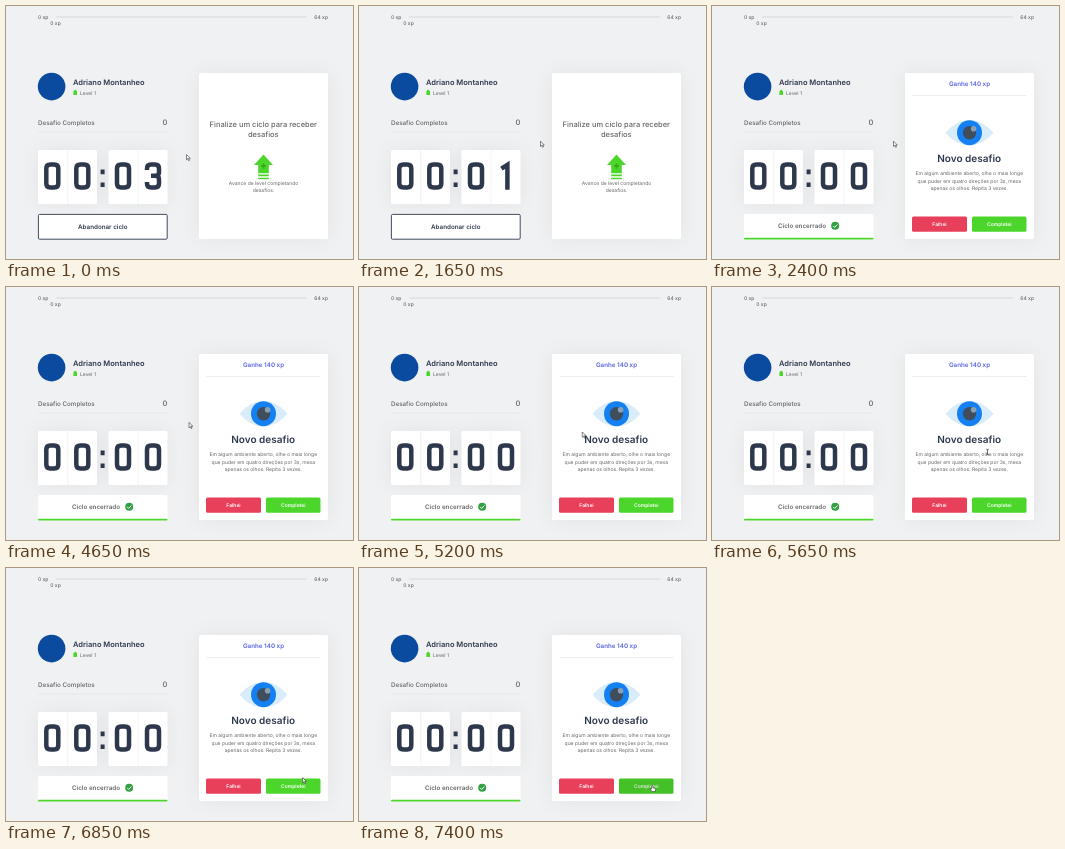
An HTML page for the animation above (8000 ms loop, 347 by 253 pixels).

```html
<!DOCTYPE html>
<html lang="pt-BR">
<head>
<meta charset="utf-8">
<title>Ciclo</title>
<style>
  html, body { margin: 0; width: 100%; height: 100%; overflow: hidden; background: #f0f1f3; }
  svg { display: block; width: 347px; height: 253px; font: 400 5px Inter, sans-serif; text-rendering: geometricPrecision; }
  text { fill: #666; }
  .mid { text-anchor: middle; }
  .end { text-anchor: end; }
  .w5 { font-weight: 500; }
  .w6 { font-weight: 600; }
  .md { font-size: 6.25px; }
  .lg { font-size: 7.5px; }
  .xl { font-size: 10px; }
  .dark { fill: #2e384d; }
  .white { fill: #fff; }
  .card { fill: #fff; filter: drop-shadow(0 0 9.4px rgba(0, 0, 0, .055)); }
  .line { stroke: #d9dadd; stroke-width: .5; }
  .digit { fill: none; stroke: #2e384d; stroke-width: 4.5; }
</style>
</head>
<body>
<svg viewBox="0 0 347 253">
  <rect width="347" height="253" fill="#f0f1f3"/>

  <!-- experience bar -->
  <g class="w5">
    <text x="32" y="13">0 xp</text>
    <text x="44.3" y="19">0 xp</text>
    <text class="end" x="322" y="13">64 xp</text>
  </g>
  <rect x="50" y="10.4" width="251" height="1.2" rx=".6" fill="#d6d7da"/>

  <!-- profile -->
  <circle cx="45.6" cy="80.6" r="13.8" fill="#0a4a9f"/>
  <text class="w6 lg dark" x="67" y="79">Adriano Montanheo</text>
  <path d="M69.2 83.6l1.8 1.6v3.8h-3.6v-3.8z" fill="#4cd62b"/>
  <text x="74" y="88.5">Level 1</text>
  <text class="w5 md" x="32" y="119">Desafio Completos</text>
  <text class="w5 lg end" x="161.3" y="119.4">0</text>
  <path class="line" d="M32 126H161.5"/>

  <!-- countdown -->
  <rect class="card" x="32" y="144" width="59" height="54" rx="1.5"/>
  <rect class="card" x="102.5" y="144" width="59" height="54" rx="1.5"/>
  <path d="M61.7 144v54M132 144v54" stroke="#eceef1" stroke-width=".7"/>
  <path class="dark" d="M94.6 163.6h4v4.6h-4zM94.6 176.4h4v4.6h-4z"/>
  <g id="digits"></g>

  <!-- cycle running -->
  <g id="running">
    <rect x="32.4" y="208.4" width="128.8" height="24.8" rx="1.2" fill="#fff" stroke="#2e384d" stroke-width=".9"/>
    <text class="w6 md dark mid" x="96.8" y="222.8">Abandonar ciclo</text>
  </g>

  <rect class="card" x="193" y="67" width="129" height="166" rx="1.5"/>
  <g id="waiting" class="mid">
    <g class="w5 lg">
      <text x="257.3" y="120.6">Finalize um ciclo para receber</text>
      <text x="257.3" y="131.1">desafios</text>
    </g>
    <path d="M257.5 148.5L267 159H262.8V167.2H252.2V159H248zM252.2 168.6h10.6v1.7h-10.6zM252.2 171.7h10.6v1.6h-10.6z" fill="#4cd62b"/>
    <path d="M257.5 157.2v5.2M254.9 159.8h5.2" stroke="#36ab1f" stroke-width="1.8"/>
    <text x="257.5" y="178.9">Avance de level completando</text>
    <text x="257.5" y="185.9">desafios.</text>
  </g>

  <!-- cycle finished -->
  <g id="finished" class="mid">
    <rect x="32" y="208" width="129.5" height="25.5" rx="1.5" fill="#fff"/>
    <rect x="32" y="231.8" width="129.5" height="1.7" rx=".8" fill="#4cd62b"/>
    <text class="w6 md" x="90" y="222.2">Ciclo encerrado</text>
    <circle cx="123.2" cy="219.8" r="4" fill="#32a043"/>
    <path d="M121.2 219.9l1.5 1.5 2.7-2.9" fill="none" stroke="#fff" stroke-width="1"/>

    <text class="w6 md" x="257.5" y="80.4" style="fill:#5965e0">Ganhe 140 xp</text>
    <path class="line" d="M200.5 89.6H314.5"/>
    <path d="M233.5 126.7Q244 114 257.5 114T281.5 126.7Q271 139.4 257.5 139.4T233.5 126.7z" fill="#d9ecfc"/>
    <circle cx="257.5" cy="126.7" r="12.5" fill="#1580f2"/>
    <circle cx="257.5" cy="126.7" r="6.7" fill="#3f4d5c"/>
    <circle cx="261.6" cy="122.8" r="2.8" fill="#8aa0b3"/>
    <text class="w6 xl dark" x="257.2" y="156.2">Novo desafio</text>
    <text x="257.3" y="169.2">Em algum ambiente aberto, olhe o mais longe</text>
    <text x="257.3" y="176.7">que puder em quatro direções por 3s, mexa</text>
    <text x="257.3" y="184.2">apenas os olhos. Repita 3 vezes.</text>
    <rect x="200" y="210.6" width="55" height="15.2" rx="1.5" fill="#e83f5b"/>
    <text class="w6 white" x="227.5" y="220">Falhei</text>
    <g id="done">
      <rect x="260" y="210.6" width="54.5" height="15.2" rx="1.5" fill="#4cd62b"/>
      <text class="w6 white" x="287.3" y="220">Completei</text>
    </g>
  </g>

  <g id="cursor">
    <path id="arrow" d="M0 0v5.2l1.2-1.1 .9 2 .9-.4-.9-1.9h1.7z" fill="#fff" stroke="#333" stroke-width=".6"/>
    <path id="beam" d="M-1.1-2.8q1.1 0 1.1 .7 0-.7 1.1-.7M0-2.1v4.2M-1.1 2.8q1.1 0 1.1-.7 0 .7 1.1 .7" fill="none" stroke="#222" stroke-width=".7"/>
    <path id="hand" d="M-.6.5q.6-.9 1.2 0v2l2.1.6q.7.3.6 1l-.4 2.3h-3.2l-2-2.6q.1-.9 1-.4l.7.5z" fill="#fff" stroke="#222" stroke-width=".55"/>
  </g>
</svg>
<script>
const LOOP = 8000, END = 2250;
const $ = id => document.getElementById(id);
const show = (id, on) => $(id).style.display = on ? "" : "none";

const shapes = [
  "M-6-7.5q0-4 4-4h4q4 0 4 4v15q0 4-4 4h-4q-4 0-4-4z",
  "M-4.6-7.4L1.4-11.2V13.8",
  "M-6-5.5v-2q0-4 4-4h4q4 0 4 4v2.5q0 2-1.5 4L-5.4 11.5H8.2",
  "M-6-6v-1.5q0-4 4-4h4q4 0 4 4v4q0 3.3-4 3.3h-4h4q4 0 4 3.7v4q0 4-4 4h-4q-4 0-4-4v-1.5"
];
const digits = [46.3, 76.3, 117, 147].map(x => {
  const p = document.createElementNS("http://www.w3.org/2000/svg", "path");
  p.setAttribute("class", "digit");
  p.setAttribute("transform", `translate(${x} 170)`);
  p.setAttribute("d", shapes[0]);
  return $("digits").appendChild(p);
});

// pointer path: time, x, y
const path = [
  [0, 180.5, 148.6], [350, 180.5, 148.6], [800, 181.5, 135.2], [4600, 181.5, 135.2],
  [4850, 189, 136.5], [5450, 247.5, 151], [5650, 275.5, 165], [6000, 290, 182],
  [6400, 297.5, 197], [6900, 296.5, 211], [7150, 293.3, 217.2], [LOOP, 293.3, 217.2]
];
function pointer(t) {
  const i = path.findIndex(k => k[0] > t);
  const [t0, x0, y0] = path[i - 1], [t1, x1, y1] = path[i];
  const u = (t - t0) / (t1 - t0);
  return [x0 + (x1 - x0) * u, y0 + (y1 - y0) * u];
}

function draw(t) {
  const left = t < 200 ? 3 : t < 1200 ? 2 : t < 2200 ? 1 : 0;
  digits[3].setAttribute("d", shapes[left]);
  const over = t >= END;
  show("running", !over);
  show("waiting", !over);
  show("finished", over);

  const [x, y] = pointer(t);
  const hand = y > 210.6;
  const beam = x > 248 && y < 188;
  show("hand", hand);
  show("beam", beam);
  show("arrow", !hand && !beam);
  $("cursor").setAttribute("transform", `translate(${x} ${y})`);

  const hover = Math.min(1, Math.max(0, (t - 6900) / 200));
  $("done").style.filter = `brightness(${1 - .1 * hover})`;
}

const start = performance.now();
function tick() {
  draw((performance.now() - start) % LOOP);
  requestAnimationFrame(tick);
}
tick();
</script>
</body>
</html>
```
